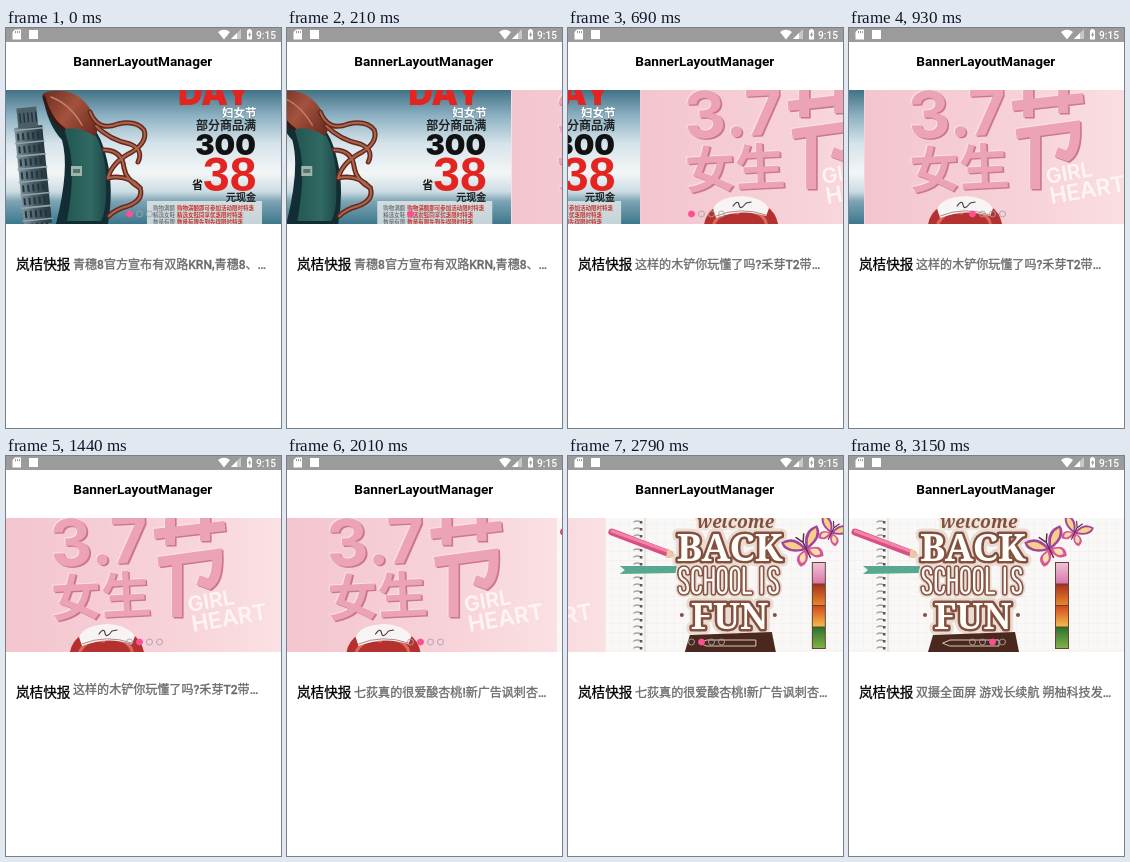
An HTML page with a canvas that plays this animation: 275 by 400 pixels, repeating every 3540 ms.

```html
<!DOCTYPE html>
<html lang="zh">
<head>
<meta charset="utf-8">
<title>BannerLayoutManager</title>
<style>
html, body { margin: 0; width: 100%; height: 100%; overflow: hidden; background: #fff; }
canvas { display: block; width: 275px; height: 400px; }
</style>
</head>
<body>
<canvas id="stage"></canvas>
<script>
const W = 275, H = 400, LOOP = 3540;
const TOP = 62, BOTTOM = 196;
const SANS = 'Roboto, "Noto Sans CJK SC", "Noto Sans CJK", sans-serif';
const CJK = '"Noto Sans CJK SC", "Noto Sans CJK", sans-serif';
const SERIF = '"Noto Serif", serif';

const canvas = document.getElementById('stage');
const ctx = canvas.getContext('2d');
const ratio = window.devicePixelRatio || 1;
canvas.width = W * ratio;
canvas.height = H * ratio;

const NEWS = [
  '青穗8官方宣布有双路KRN,青穗8、…',
  '这样的木铲你玩懂了吗?禾芽T2带…',
  '七荻真的很爱酸杏桃!新广告讽刺杏…',
  '双摄全面屏 游戏长续航 朔柚科技发…'
];

const TICKS = [0, 390, 1140, 1440, 1830, 2010, 2340, 2430, 3060, 3090];
const SLIDE = { starts: [10, 1995], time: 1135 };
const ROLL = { starts: [317, 1417, 2800], time: 380 };

function tick(t) {
  const base = TICKS.filter(x => x <= t).pop();
  return base + Math.floor((t - base) / 60) * 60;
}

// Steady scroll, then a decelerating stop
function ease(p) {
  if (p <= 0) return 0;
  if (p >= 1) return 1;
  if (p < 0.7) return p / 0.7 * 0.862;
  const q = (1 - p) / 0.3;
  return 1 - 0.138 * q * q;
}

const progress = (m, t) => m.starts.reduce((sum, s) => sum + ease((t - s) / m.time), 0);

function text(str, x, y, font, fill, align = 'left') {
  ctx.font = font;
  ctx.textAlign = align;
  ctx.fillStyle = fill;
  ctx.fillText(str, x, y);
}

function outlined(str, x, y, font, fill, layers) {
  for (const [color, width] of layers) {
    ctx.font = font;
    ctx.textAlign = 'left';
    ctx.strokeStyle = color;
    ctx.lineWidth = width;
    ctx.strokeText(str, x, y);
  }
  text(str, x, y, font, fill);
}

// Regular weight thickened to a medium one
const medium = (str, x, y, font, fill) => outlined(str, x, y, font, fill, [[fill, 0.3]]);

function rect(x, y, w, h, fill) {
  ctx.fillStyle = fill;
  ctx.fillRect(x, y, w, h);
}

function shape(d, fill) {
  ctx.fillStyle = fill;
  ctx.fill(new Path2D(d));
}

function line(d, color, width) {
  ctx.strokeStyle = color;
  ctx.lineWidth = width;
  ctx.stroke(new Path2D(d));
}

function gradient(x0, y0, x1, y1, ...stops) {
  const g = ctx.createLinearGradient(x0, y0, x1, y1);
  stops.forEach(([at, color]) => g.addColorStop(at, color));
  return g;
}

function at(x, y, angle, draw) {
  ctx.save();
  ctx.translate(x, y);
  ctx.rotate(angle);
  draw();
  ctx.restore();
}

function tower() {
  at(32, 196, -0.1, () => {
    rect(-14, -98, 28, 98, gradient(-14, 0, 14, 0, [0, '#7b9098'], [0.5, '#465a63'], [1, '#25363f']));
    rect(-10, -117, 20, 20, '#4b5f68');
    for (let y = -96; y < 0; y += 13) {
      rect(-15, y, 30, 1.6, '#93a4aa');
      for (let x = -12; x < 13; x += 5) rect(x, y + 4, 2, 7, '#24343c');
    }
    for (let x = -8; x < 9; x += 4) rect(x, -112, 1.6, 10, '#25363f');
  });
}

function sandal() {
  shape('M37 68Q41 96 56 112Q64 140 50 196H102Q108 160 101 132Q96 108 84 96Z', '#122d33');
  shape('M58 100Q78 96 90 108Q101 128 100 158Q101 182 95 193H61Q69 150 64 122Z',
    gradient(60, 0, 102, 0, [0, '#245752'], [0.6, '#2f6a63'], [1, '#1d4647']));
  shape('M36 67Q40 62 58 63Q76 66 86 84Q96 102 88 108Q74 98 58 101Q42 92 36 67Z',
    gradient(36, 64, 90, 104, [0, '#6b2b1f'], [0.5, '#a4523d'], [1, '#6d2c20']));
  line('M45 69Q64 76 76 97', '#c58069', 1.5);
  line('M38 69Q44 92 58 101', '#3a1712', 3);
  const straps = [
    'M84 84Q92 104 112 96Q130 92 138 102Q142 114 126 124Q106 134 102 150',
    'M90 98Q104 112 124 116Q138 122 132 134',
    'M98 122Q116 122 118 140Q120 152 134 160',
    'M102 150Q122 146 134 160Q138 172 122 178Q110 181 103 188'
  ];
  straps.forEach(d => line(d, '#66291d', 5));
  straps.forEach(d => line(d, '#ad644c', 2));
  rect(65, 138, 11, 10, '#9fb5aa');
  rect(67, 141, 7, 4, '#55756f');
}

function shoePage() {
  rect(0, TOP, W, 134, gradient(0, TOP, 0, BOTTOM, [0, '#427286'], [0.2, '#8fb3c4'],
    [0.4, '#d5e3ea'], [0.62, '#f3f6f7'], [0.76, '#cbdbe2'], [0.83, '#7da4b4'], [1, '#3c778c']));
  rect(141, 173, 115, 23, 'rgba(232,236,236,.8)');
  tower();
  sandal();
  text('DAY', 172, 77, '900 34px Inter, sans-serif', '#e32420');
  outlined('妇女节', 216, 89, '700 11.5px ' + CJK, '#fff', [['#7897a5', 1.5]]);
  medium('部分商品满', 190, 102, '500 12px ' + CJK, '#161616');
  text('300', 219.5, 127, '900 29px Inter, sans-serif', '#111', 'center');
  text('38', 197, 163, '700 48px "Liberation Sans", Arial, sans-serif', '#e32420');
  text('省', 186, 161, '700 11px ' + CJK, '#161616');
  medium('元现金', 220, 173, '500 10px ' + CJK, '#161616');
  ['购物满额即可参加活动', '精选女鞋同享优惠', '数量有限先到先得'].forEach((s, i) => {
    const y = 182 + i * 7;
    text(s.slice(0, 4), 147, y, '500 5.5px ' + CJK, '#4d5558');
    text(s + '限时特惠', 171, y, '700 5.5px ' + CJK, '#c8352e');
  });
}

const JIE = 'M148 78L219 70M164 58V89M199 56V85M152 106L211 98Q212 122 203 128L192 124M171 104V161';

// Pink lettering with a light edge above and a dark one below
function embossed(draw) {
  at(-1, -1, 0, () => draw('#fbe0e5'));
  at(1.6, 1.4, 0, () => draw('#cb7590'));
  draw('#eba3b5');
}

function girlPage() {
  rect(0, TOP, W, 134, gradient(0, 0, W, 0, [0, '#f3c5cf'], [0.6, '#f7d2d9'], [1, '#fae1e3']));
  at(45, 111, -0.05, () => embossed(c => text('3.7', 0, 0, '700 65px Inter, sans-serif', c)));
  at(46, 161, -0.05, () => embossed(c => text('女生', 0, 0, '700 50px ' + CJK, c)));
  ctx.lineJoin = 'miter';
  ctx.lineCap = 'butt';
  embossed(c => line(JIE, c, 10));
  ctx.lineJoin = ctx.lineCap = 'round';
  at(183, 156, -0.17, () => text('GIRL', 0, 0, '600 21px Inter, sans-serif', '#fff4f5'));
  at(187, 176, -0.17, () => text('HEART', 0, 0, '600 22.5px Inter, sans-serif', '#fff4f5'));
  shape('M64 196Q68 174 101 172Q133 172 138 196Z', '#b4312f');
  line('M74 195Q82 181 98 185M126 195Q124 187 114 184', '#e0695a', 3);
  shape('M73 181Q78 169 102 168Q121 169 129 180L126 188Q100 180 76 190Z', '#f8f4f4');
  line('M76 188Q100 178 126 187', '#a58d94', 1);
  line('M93 178Q98 171 99 177T106 175L111 174', '#4a3a40', 1.2);
}

const GLYPHS = {
  S: 'M9 6Q9 1 5 1Q1 1 1 6Q1 11 5 13Q9 16 9 21Q9 26 5 26Q1 26 1 21',
  C: 'M9 7Q9 1 5 1Q1 1 1 7V20Q1 26 5 26Q9 26 9 20',
  H: 'M1 1V26M9 1V26M1 13H9',
  O: 'M5 1Q1 1 1 7V20Q1 26 5 26Q9 26 9 20V7Q9 1 5 1Z',
  L: 'M1 1V26H8',
  I: 'M1 1V26',
  ' ': ''
};
const ADVANCE = { I: 8, ' ': 5 };

function tallWord(str, x, y) {
  for (const [color, width] of [['#eadcd3', 9], ['#865545', 5.6], ['#fffaf6', 2.4]]) {
    let pen = x;
    for (const ch of str) {
      at(pen, y, 0, () => line(GLYPHS[ch], color, width));
      pen += ADVANCE[ch] || 12.8;
    }
  }
}

function butterfly(x, y, size, angle) {
  at(x, y, angle, () => {
    ctx.scale(size, size);
    for (const side of [-1, 1]) {
      ctx.save();
      ctx.scale(side, 1);
      shape('M0 0Q4 -17 19 -15Q21 -2 0 2Z', '#a2449a');
      shape('M0 1Q17 2 12 14Q3 15 0 4Z', '#d9559b');
      shape('M3 -2Q7 -13 17 -13Q16 -4 3 -1Z', '#f6cf8a');
      shape('M3 3Q12 4 10 11Q4 12 3 4Z', '#f9e0a4');
      ctx.restore();
    }
    line('M0 -6V10M0 -6L-4 -13M0 -6L4 -13', '#5b2a4c', 1.4);
  });
}

function schoolPage() {
  rect(0, TOP, W, 134, '#f9f8f7');
  for (let x = 5; x < W; x += 9) rect(x, TOP, 0.6, 134, '#f2f0ee');
  for (let y = 68; y < BOTTOM; y += 9) rect(0, y, W, 0.6, '#f2f0ee');
  rect(38, TOP, 2, 134, '#e6e3e0');
  for (let y = 66; y < BOTTOM; y += 7) {
    line(`M28 ${y}Q31 ${y - 2} 35 ${y}`, '#a7a3a0', 1.4);
    rect(34, y - 1, 2.5, 2.5, '#5d5754');
  }
  line('M6 76L64 98', '#d84f83', 7);
  line('M6 75L64 96', '#f383aa', 3);
  shape('M62 92L72 101L60 102Z', '#e8c9a4');
  shape('M14 110H71V117L14 118L19 114Z', '#56a890');

  const layers = [['#eadcd3', 11], ['#83503f', 5]];
  outlined('welcome', 91, 72, 'italic 700 17.5px ' + SERIF, '#83503f', [['#efe4dc', 5]]);
  outlined('BACK', 71, 105, '700 38px ' + SERIF, '#fffdfa', layers);
  tallWord('SCHOOL IS', 73, 111);
  outlined('FUN', 85, 173, '700 36px ' + SERIF, '#fffdfa', layers);
  for (const x of [76, 169]) {
    ctx.beginPath();
    ctx.arc(x, 159, 2, 0, 7);
    ctx.fillStyle = '#83503f';
    ctx.fill();
  }
  shape('M84 179L166 176L170 196H79Z', '#4b281d');
  line('M94 187L101 184H150V190H101Z', '#d8c7bb', 1);

  butterfly(200, 92, 1.05, -0.45);
  butterfly(226, 76, 0.8, 0.45);
  rect(206, 106, 14, 87, '#5d4538');
  [['#f0c0d8', '#d979a8'], ['#a8321f', '#e8862c'], ['#d4491f', '#f2bb4a'], ['#2f7030', '#7fb347']].forEach(([a, b], i) => {
    const y = 107 + i * 21.5;
    rect(207, y, 12, 20.5, gradient(0, y, 0, y + 20.5, [0, a], [1, b]));
  });
}

const PAGES = [shoePage, girlPage, schoolPage];

function banner(pos) {
  PAGES.forEach((draw, i) => {
    const x = (i - pos) * W;
    if (Math.abs(x) >= W) return;
    ctx.save();
    ctx.translate(x, 0);
    ctx.beginPath();
    ctx.rect(0, TOP, W, BOTTOM - TOP);
    ctx.clip();
    draw();
    ctx.restore();
  });
}

function dots(active) {
  for (let i = 0; i < 4; i++) {
    ctx.beginPath();
    ctx.arc(123.5 + i * 10, 186, 3, 0, 7);
    if (i === active) {
      ctx.fillStyle = '#ff4f93';
      ctx.fill();
    }
    ctx.strokeStyle = i === active ? '#ff4f93' : '#a8a3a5';
    ctx.lineWidth = 0.9;
    ctx.stroke();
  }
}

function news(pos) {
  medium('岚桔快报', 10, 241, '500 13.6px ' + SANS, '#000');
  ctx.save();
  ctx.beginPath();
  ctx.rect(66, 217, 200, 38);
  ctx.clip();
  NEWS.forEach((s, i) => medium(s, 67, 241 + (i - pos) * 37, '500 12.05px ' + SANS, '#6a6a6a'));
  ctx.restore();
}

function header() {
  rect(0, 0, W, 14, '#9b9b9b');
  shape('M9 1.5H15V11.5H6.5V4Z', '#fff');
  for (let x = 9; x < 14; x += 2) rect(x, 3, 1, 2.2, '#9b9b9b');
  rect(23, 2, 9, 9, '#fff');
  shape('M212 4Q218 -0.5 224 4L218 11.5Z', '#fff');
  shape('M235 1V11H225Z', 'rgba(255,255,255,.45)');
  shape('M231 5V11H225Z', '#fff');
  shape('M241 2.2H242.3V1H244.7V2.2H246V11.5H241Z', '#fff');
  shape('M244.2 3.6L241.9 7.3H243.2V10L245.3 6.3H244.2Z', '#9b9b9b');
  text('9:15', 270, 10.5, '500 10.2px ' + SANS, '#fff', 'right');
  text('BannerLayoutManager', 136.8, 38, '700 13.6px ' + SANS, '#000', 'center');
}

function render(now) {
  const t = tick(now % LOOP);
  const pos = progress(SLIDE, t);
  ctx.setTransform(ratio, 0, 0, ratio, 0, 0);
  ctx.lineJoin = ctx.lineCap = 'round';
  rect(0, 0, W, H, '#fff');
  header();
  banner(pos);
  dots(Math.floor(pos));
  news(progress(ROLL, t));
}

const start = performance.now();
function loop() {
  render(performance.now() - start);
  requestAnimationFrame(loop);
}
loop();
</script>
</body>
</html>
```
